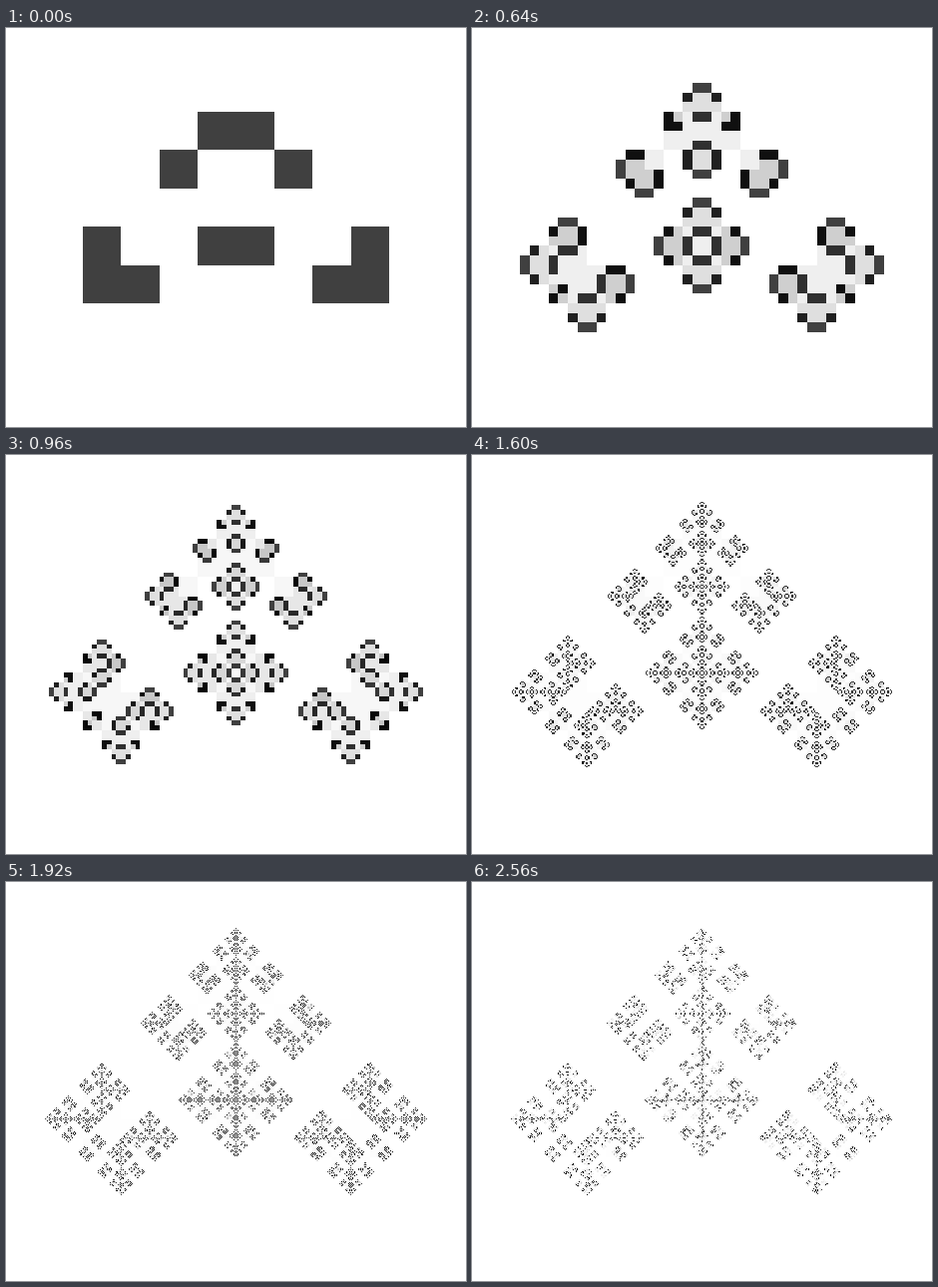
An HTML page with a canvas for the animation above (2880 ms loop, 461 by 400 pixels).

```html
<!DOCTYPE html>
<html lang="en">
<head>
<meta charset="utf-8">
<title>Life on a doubling grid</title>
<style>
  html, body { margin: 0; width: 100%; height: 100%; overflow: hidden; background: #fff; }
  canvas { display: block; }
</style>
</head>
<body>
<canvas id="stage" width="461" height="400"></canvas>
<script>
const WIDTH = 461, HEIGHT = 400;
const STEP = 320, STEPS = 9;
const UNIT = 38.4;                 // side of a cell on the first grid
const LEFT = UNIT, TOP = 84 - UNIT; // corner of the grid, one cell of margin included
const SEED = [
  "..........",
  "....##....",
  "...#..#...",
  "..........",
  ".#..##..#.",
  ".##....##.",
  ".........."
];

const ctx = document.getElementById("stage").getContext("2d");

function firstGrid() {
  const w = SEED[0].length, h = SEED.length;
  const alive = Uint8Array.from(SEED.join(""), c => c === "#" ? 1 : 0);
  return { w, h, alive, trace: Float32Array.from(alive, a => a / 2) };
}

// Split each cell into four, then apply one generation of Life.
// The trace keeps the past lives of a cell, halved at each step.
function nextGrid(grid) {
  const w = grid.w * 2, h = grid.h * 2;
  const old = new Uint8Array(w * h);
  const alive = new Uint8Array(w * h);
  const trace = new Float32Array(w * h);
  for (let y = 0; y < h; y++) {
    for (let x = 0; x < w; x++) {
      const from = (y >> 1) * grid.w + (x >> 1);
      old[y * w + x] = grid.alive[from];
      trace[y * w + x] = grid.trace[from] / 2;
    }
  }
  for (let y = 1; y < h - 1; y++) {
    for (let x = 1; x < w - 1; x++) {
      const i = y * w + x;
      const around = old[i - w - 1] + old[i - w] + old[i - w + 1] +
        old[i - 1] + old[i + 1] +
        old[i + w - 1] + old[i + w] + old[i + w + 1];
      if (around === 3 || (around === 2 && old[i])) {
        alive[i] = 1;
        trace[i] += 0.5;
      }
    }
  }
  return { w, h, alive, trace };
}

// Each pixel takes the shade of the cell under its centre.
function paint(grid) {
  const image = ctx.createImageData(WIDTH, HEIGHT);
  image.data.fill(255);
  const cell = UNIT * SEED[0].length / grid.w;
  for (let y = 0; y < HEIGHT; y++) {
    const row = Math.floor((y + 0.5 - TOP) / cell);
    if (row < 0 || row >= grid.h) continue;
    for (let x = 0; x < WIDTH; x++) {
      const col = Math.floor((x + 0.5 - LEFT) / cell);
      if (col < 0 || col >= grid.w) continue;
      const at = row * grid.w + col;
      const level = Math.round(255 * (1 - (grid.alive[at] + grid.trace[at]) / 2));
      const pixel = (y * WIDTH + x) * 4;
      image.data.fill(level, pixel, pixel + 3);
    }
  }
  return image;
}

const images = [];
for (let grid = firstGrid(), n = 0; n < STEPS; n++) {
  images.push(paint(grid));
  if (n < STEPS - 1) grid = nextGrid(grid);
}

let shown = -1;
const start = performance.now();

function draw(now) {
  const time = Math.max(0, now - start) % (STEP * STEPS);
  const index = Math.floor(time / STEP);
  if (index !== shown) {
    ctx.putImageData(images[index], 0, 0);
    shown = index;
  }
  requestAnimationFrame(draw);
}
draw(start);
</script>
</body>
</html>
```
